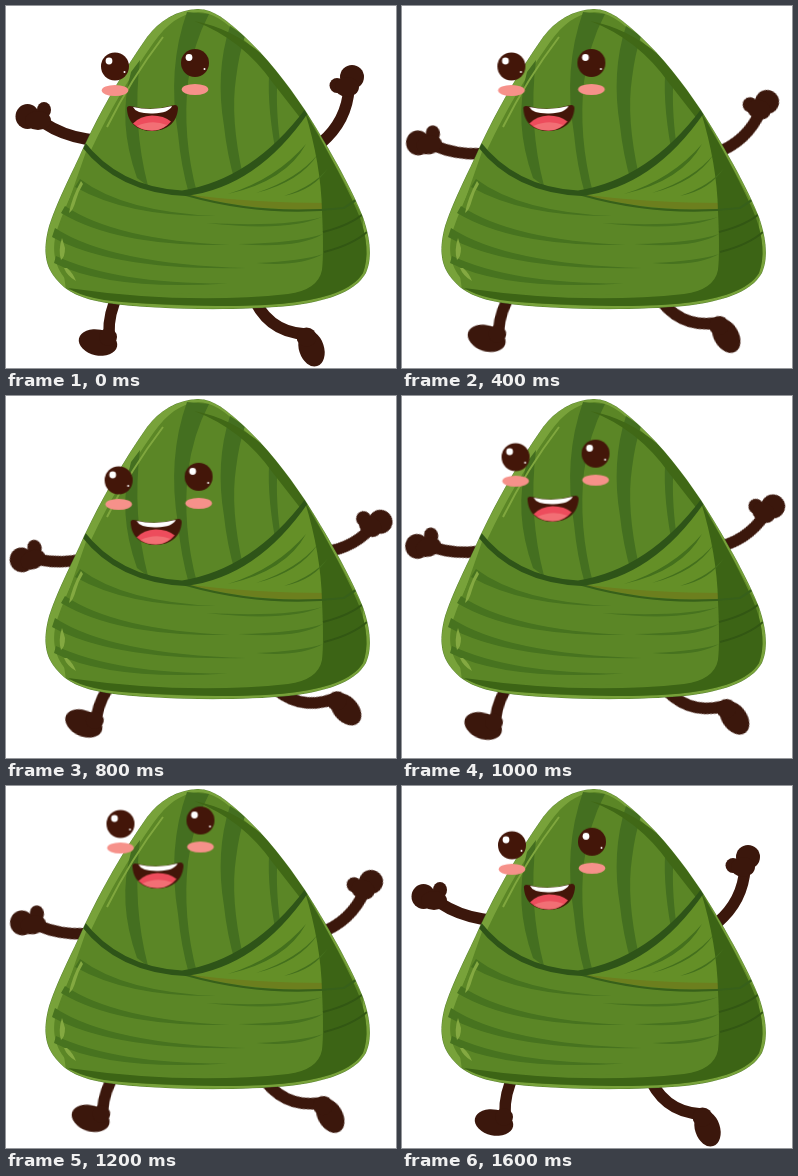
Write an HTML page that moves like this. It is 390 by 362 pixels and loops after 1.7 s.

```html
<!DOCTYPE html>
<html lang="en">
<head>
<meta charset="utf-8">
<title>Dancing rice dumpling</title>
<style>
html, body { margin: 0; width: 100%; height: 100%; overflow: hidden; background: #fff; }
svg { display: block; width: 390px; height: 362px; }

.limb { fill: #3b170c; animation: swing 1.7s infinite; }
.limb path { fill: none; stroke: #3b170c; stroke-width: 11.5; stroke-linecap: round; }
.arm-l { --turn: -22deg; transform-origin: 156px 152px; }
.arm-r { --turn: 40deg; transform-origin: 285px 137.5px; }
.leg-l { --turn: 12deg; transform-origin: 128px 264.5px; }
.leg-r { --turn: -24deg; transform-origin: 254px 247px; }
.face { animation: roam 1.7s infinite; }

/* 17 ticks of 100 ms per loop */
@keyframes swing {
  0% { transform: rotate(0deg); animation-timing-function: steps(8); }
  47.05% { transform: rotate(var(--turn)); animation-timing-function: steps(8); }
  94.11%, 100% { transform: rotate(0deg); }
}
@keyframes roam {
  0% { transform: translate(0, 0); animation-timing-function: steps(4); }
  23.52% { transform: translate(.4px, 0); animation-timing-function: steps(2); }
  35.29% { transform: translate(2.7px, 47px); animation-timing-function: steps(6); }
  70.58% { transform: translate(5.5px, -22.5px); animation-timing-function: steps(4); }
  94.11%, 100% { transform: translate(1px, -1.2px); }
}
</style>
</head>
<body>
<svg viewBox="0 0 390 362">
  <defs>
    <path id="shape" d="M191 3C171 4 154 14 141 31C117 65 95 104 78 140C66 167 51 195 43 220C37 242 38 259 50 273C60 286 76 293 100 297C150 304 230 305 283 300C318 296 349 287 360 267C367 252 364 231 357 211C345 180 319 135 299 104C281 77 260 50 237 29C221 14 206 2 191 3Z"/>
    <clipPath id="body"><use href="#shape"/></clipPath>
  </defs>

  <g class="limb arm-l">
    <path d="M38 117Q56 129 80 133L100 136"/>
    <ellipse cx="21.500" cy="110.500" rx="12" ry="12.500"/>
    <ellipse cx="38" cy="104" rx="7" ry="8"/>
    <ellipse cx="32" cy="114.500" rx="13" ry="9.500"/>
  </g>
  <g class="limb arm-r">
    <path d="M343 82Q341 115 315 137L296 150"/>
    <ellipse cx="331" cy="79.500" rx="7.500" ry="7.500"/>
    <ellipse cx="346" cy="71" rx="12" ry="12"/>
    <ellipse cx="341" cy="81" rx="12" ry="10"/>
  </g>
  <g class="limb leg-l">
    <path d="M113 286Q102 308 103 328"/>
    <ellipse cx="92" cy="336.500" rx="19.500" ry="13" transform="rotate(12 92 336.500)"/>
    <ellipse cx="102" cy="331" rx="9" ry="9"/>
  </g>
  <g class="limb leg-r">
    <path d="M245 286Q260 326 299 328"/>
    <ellipse cx="305.500" cy="342.500" rx="12.500" ry="18.500" transform="rotate(-18 305.500 342.500)"/>
    <ellipse cx="300.500" cy="331" rx="10" ry="9.500"/>
  </g>

  <g clip-path="url(#body)">
    <use href="#shape" fill="#78a23a"/>
    <path fill="#5b8626" d="M192 6C174 8 161 18 148 36C124 70 103 106 86 142C75 168 60 198 52 221C44 244 49 262 62 276C73 288 91 292 112 295C165 301 235 301 283 297C318 293 347 284 357 267C363 252 361 231 354 212C342 181 317 137 296 105C278 77 257 51 235 31C219 15 206 6 192 6Z"/>

    <!-- upper leaf -->
    <path fill="#446f20" d="M125 66Q111 116 131 172L142 180Q126 118 134 54Z
      M181 6Q161 62 172 128Q175 160 183 188L191 187Q176 130 182 76Q187 38 203 8Z
      M224 20Q209 66 218 120Q221 148 229 176L237 170Q224 112 230 72Q233 48 239 30Z
      M264 58Q260 92 269 142L274 136Q269 96 272 68Z"/>
    <path fill="#406816" d="M188 15Q236 33 267 77L299 118L304 108Q279 73 258 50Q226 22 188 15Z"/>

    <!-- wrapped leaves -->
    <path fill="#5b8626" d="M82 140Q112 182 176 188Q247 176 300 105L357 211V267L310 292L60 284L52 226Z"/>
    <path fill="#648f27" d="M182 189Q249 178 300 108L350 198Q275 206 182 189Z"/>
    <path fill="#6c7f1e" d="M178 188Q245 197 324 197L326 203Q250 207 178 188Z"/>
    <path fill="#3c6415" d="M299 106Q315 158 316 205Q318 246 316 264Q312 284 282 288Q180 299 62 282Q82 295 130 297Q235 303 283 297C318 293 347 284 357 267C363 252 361 231 354 212C342 181 317 137 299 106Z"/>
    <path fill="#44701d" d="M222 188Q270 173 300 138Q280 175 222 188Z
      M250 187Q292 173 312 148Q294 176 250 187Z
      M278 190Q308 180 322 162Q308 184 278 190Z"/>
    <path fill="#47731f" d="M74 173Q118 206 210 210Q122 211 69 181Z
      M59 200Q110 234 224 239Q112 241 55 207Z
      M49 222Q104 258 240 262Q108 265 46 231Z
      M50 250Q110 278 222 277.500Q104 285 48 257Z
      M200 217Q282 221 316 211Q282 226 200 217Z
      M232 238Q290 237 317 228Q292 243 232 238Z
      M250 257Q296 255 317 248Q294 261 250 257Z"/>
    <path fill="none" stroke="#325713" stroke-width="2" d="M317 226Q345 219 358 207M318 246Q346 239 361 226"/>
    <path fill="none" stroke="#37601a" stroke-width="2.200" d="M180 189Q258 211 338 202L356 190"/>
    <path fill="#2e5418" d="M77 134Q113 181 176 184.500Q247 173 300 102L302 107Q251 181 180 190Q112 187 76 141Z"/>

    <!-- highlights -->
    <path fill="#84a941" d="M75 175Q66 191 63 207Q67 205 70 194Q72 186 77 178Z
      M56 232Q52 244 55 254Q59 251 59 242Z
      M58 262Q61 270 70 275Q67 267 61 262Z"/>
    <path fill="none" stroke="#80a73e" stroke-width="2" d="M157 31Q125 73 101 121"/>
    <use href="#shape" fill="none" stroke="#547f2b"/>
  </g>

  <g class="face">
    <g fill="#431609">
      <circle cx="109" cy="60.500" r="14"/>
      <circle cx="189" cy="57" r="14"/>
    </g>
    <g fill="#fff">
      <circle cx="103" cy="55" r="3.400"/>
      <circle cx="183" cy="51.500" r="3.400"/>
      <circle cx="118.500" cy="66" r="1"/>
      <circle cx="198.500" cy="63" r="1"/>
    </g>
    <g fill="#f6918a">
      <ellipse cx="109" cy="84.500" rx="13.300" ry="5.500"/>
      <ellipse cx="189" cy="83.500" rx="13.300" ry="5.500"/>
    </g>
    <path fill="#431609" d="M121 103.500Q120 98.500 127 100.500Q146 105.500 166 99.500Q172 97.500 172 102.500C171 116.500 161 125 146 125C132 125 122 117.500 121 103.500Z"/>
    <path fill="#fff" d="M127 101Q146 105.500 166 100Q163 107 147 107.500Q130 108 127 101Z"/>
    <path fill="#ed4c5c" d="M127 117.500Q134 110 146 109.500Q158 109.500 165 115.500Q158 124.500 146 124.500Q134 124.500 127 117.500Z"/>
    <path fill="#f26f75" d="M131 120Q146 113 161 119Q154 124.500 146 124.500Q137 124.500 131 120Z"/>
  </g>
</svg>
</body>
</html>
```
